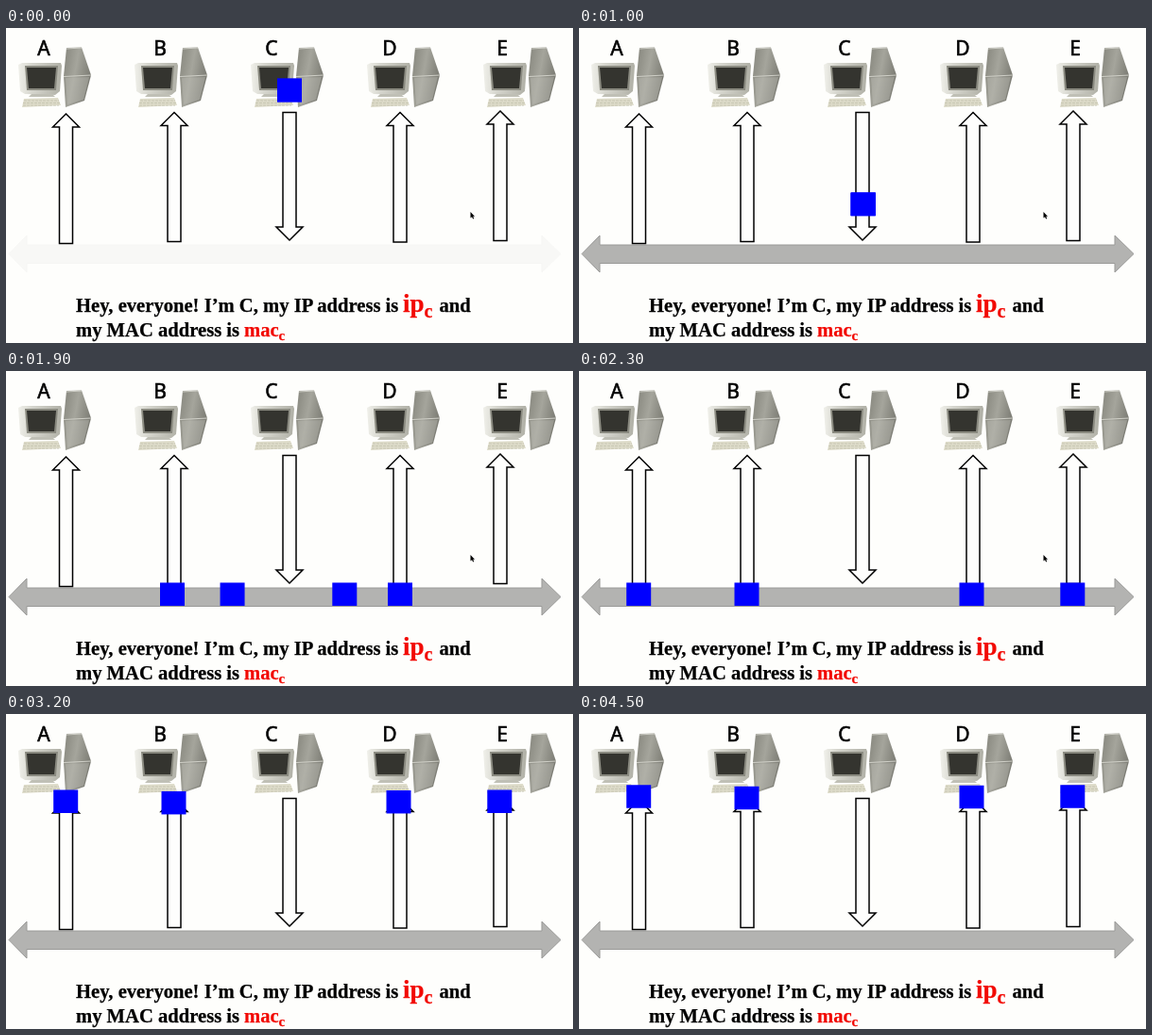
Recreate the animation shown at these times as an HTML page. Size 600 by 334 pixels, loop 4600 ms.

```html
<!DOCTYPE html>
<html lang="en">
<head>
<meta charset="utf-8">
<style>
  html, body { margin: 0; width: 100%; height: 100%; overflow: hidden; background: #fefefc; }
  svg { display: block; width: 600px; height: 334px; }
  .label { font: 21px "Noto Sans", sans-serif; text-anchor: middle; stroke: #000; stroke-width: .6; }
  .note { font: bold 20.62px "Liberation Serif", serif; stroke: #000; stroke-width: .25; }
  .red { fill: #f20a04; stroke: #f20a04; }
  .arrow { fill: #fefefd; stroke: #000; stroke-width: 1.5; }
</style>
</head>
<body>
<svg viewBox="0 0 600 334">
  <defs>
    <linearGradient id="case" x2="1" y2=".4">
      <stop offset="0" stop-color="#85857c"/>
      <stop offset=".5" stop-color="#a5a59c"/>
      <stop offset="1" stop-color="#7c7c74"/>
    </linearGradient>
    <linearGradient id="shell" x2="1">
      <stop offset="0" stop-color="#f0f0ea"/>
      <stop offset=".3" stop-color="#d6d6ce"/>
      <stop offset="1" stop-color="#b0b0a6"/>
    </linearGradient>
    <g id="computer">
      <path d="M0 39 4 37 45 37 46 40 44 67 39 71 7 70 2 67Z" fill="url(#shell)"/>
      <path d="M7 40 42 40 40 66 9 66Z" fill="#8a8a80"/>
      <path d="M9 42 40 42 38 64 11 64Z" fill="#34342f"/>
      <path d="M14 70 36 70 39 73 11 73Z" fill="#c0c0b6"/>
      <path d="M6 75 42 74 45 82 4 84Z" fill="#dedcca"/>
      <path d="M6 77H43M5 79.5H44M5 82H43" stroke="#c2c0ac" stroke-width=".8" stroke-dasharray="3 1"/>
      <path d="M51 21 67 20.500 77 50 70 77 50 84 48 51Z" fill="url(#case)"/>
      <path d="M50 53 75 52 69 76 52 81Z" fill="#c0c0b8" opacity=".4"/>
      <path d="M51 22 67 21M48 51.500 77 50" stroke="#d0d0c8"/>
    </g>
  </defs>
  <path id="bus" fill="#b3b3b1" stroke="#9a9a98"
    d="M3 239.5 22 220V230H567V220L587 239.5 567 259V249.5H22V259Z"/>
  <g id="hosts"></g>
  <path class="arrow" d="M293 89.500H307V211H314L300 225 286 211H293Z"/>
  <g class="note">
    <text x="74" y="301">Hey, everyone! I’m C, my IP address is</text>
    <text class="red" x="420" y="301" style="font-size:27px">ip</text>
    <text class="red" x="442.500" y="307" style="font-size:20px">c</text>
    <text x="458.500" y="301">and</text>
    <text x="74" y="327">my MAC address is</text>
    <text class="red" x="252" y="327">mac</text>
    <text class="red" x="288.500" y="331" style="font-size:15px">c</text>
  </g>
  <path id="cursor" d="M491.500 195V201.500L493 200.300 494.200 202.500 495.200 202 494.200 199.800H496Z"/>
  <g id="packets" fill="#00f"></g>
</svg>
<script>
const LOOP = 4600, STEP = 100;
const byId = id => document.getElementById(id);

byId("hosts").innerHTML = [["A", 40], ["B", 163], ["C", 281], ["D", 406], ["E", 525]]
  .map(([name, x], i) => `<use href="#computer" x="${13 + 123 * i}"/>
    <text class="label" x="${x}" y="28.500">${name}</text>`).join("");

// Arrow axis, tip and foot; packet x on the bus and while rising; final y; bus trip times
const receivers = [
  { x: 63.5, tip: 91, foot: 228.5, busX: 64, riseX: 63.2, endY: 87.5, leave: 1700, arrive: 2300 },
  { x: 178, tip: 89.5, foot: 226.5, busX: 176, riseX: 177.5, endY: 89, leave: 1290, arrive: 1700 },
  { x: 417, tip: 89.5, foot: 227, busX: 417, riseX: 415.5, endY: 88, leave: 1290, arrive: 1700 },
  { x: 523, tip: 88, foot: 225.5, busX: 522, riseX: 522.3, endY: 87.5, leave: 1700, arrive: 2300 },
];

for (const r of receivers) {
  byId("hosts").insertAdjacentHTML("beforeend", `<path class="arrow"
    d="M${r.x} ${r.tip}l14 14h-7V${r.foot}h-14V${r.tip + 14}h-7Z"/>`);
  byId("packets").insertAdjacentHTML("beforeend", `<rect x="-13" y="-12.250" width="26" height="24.500"/>`);
  r.packet = byId("packets").lastElementChild;
}

const ease = (t, from, to) => {
  const u = Math.min(1, Math.max(0, (t - from) / (to - from)));
  return u * u * (3 - 2 * u);
};
const mix = (a, b, u) => a + (b - a) * u;

function packetAt(r, t) {
  if (t < 1290) {
    const u = ease(t, 500, 1290);
    return [mix(300, 301, u), mix(66, 240, u)];
  }
  if (t < 2300) return [mix(301, r.busX, ease(t, r.leave, r.arrive)), 236.7];
  return [r.riseX, mix(236.7, r.endY, ease(t, 2490, 3290))];
}

function draw(now) {
  const t = Math.floor(now % LOOP / STEP) * STEP;
  byId("bus").setAttribute("opacity", Math.min(1, 0.07 + t / 500));
  byId("cursor").setAttribute("visibility", t < 2400 ? "visible" : "hidden");
  for (const r of receivers) r.packet.setAttribute("transform", `translate(${packetAt(r, t)})`);
  requestAnimationFrame(draw);
}
draw(performance.now());
</script>
</body>
</html>
```
